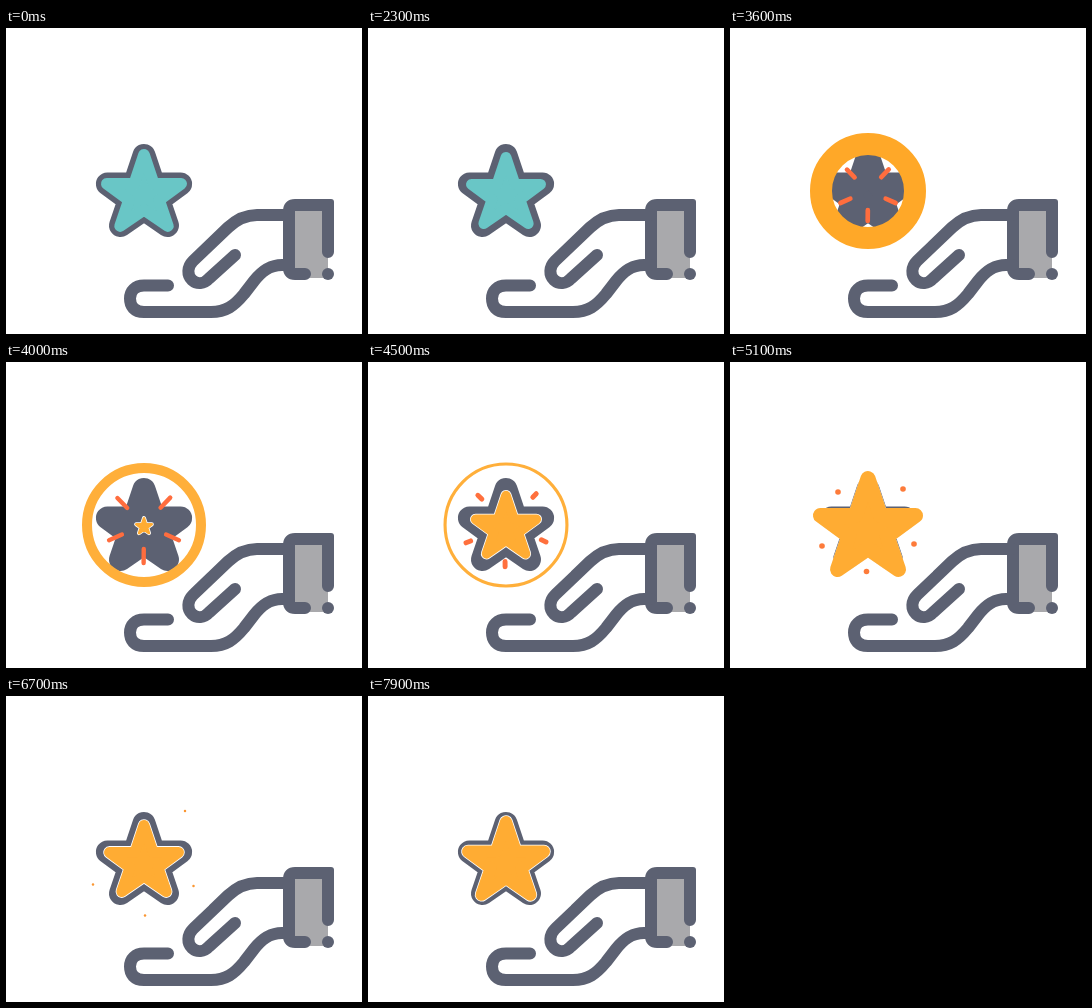
Recreate the animation shown at these times as an HTML page. Size 356 px wide and 306 px high, loop 8 s.

```html
<!DOCTYPE html>
<html lang="en">
<head>
<meta charset="utf-8">
<title>Star in hand</title>
<style>
  html, body { margin: 0; width: 100%; height: 100%; overflow: hidden; background: #fff; }
  svg { display: block; width: 100vw; height: 100vh; }
  .line { fill: none; stroke: #5c6172; stroke-width: 12; stroke-linecap: round; stroke-linejoin: round; }
</style>
</head>
<body>
<svg viewBox="0 0 356 306">
  <defs>
    <path id="star" d="M0-47.5 12.4-10.5 47.5-10.5 19.2 10.3 30.5 43.5 0 22.5-30.5 43.5-19.2 10.3-47.5-10.5-12.4-10.5Z"
      stroke-linejoin="round"/>
  </defs>

  <path fill="#a9a9ac" d="M286 180H322V250H286Z"/>
  <path class="line" d="M299 246H289Q283 246 283 240V183Q283 177 289 177H322V224"/>
  <path fill="#5c6172" d="M318 171H325Q328 171 328 174V182H318Z"/>
  <circle cx="322" cy="246" r="6" fill="#5c6172"/>
  <path class="line" d="M283 187H251C238 187 229 193 222 199.500L187 233C181 239 181 247 186 252C191 256.500 198 256 203 250.500L229 227"/>
  <path class="line" d="M283 237H276C263 237 255 244 248 253L238 266C228 278 220 284 205 284H138C128 284 124 278 124 270.500C124 263 129 257.500 138 257.500H162"/>

  <g transform="translate(138 164)">
    <use href="#star" transform="scale(.77)" fill="#5c6172" stroke="#5c6172" stroke-width="29.900"/>
    <g id="teal">
      <use href="#star" fill="#69c6c6" stroke="#69c6c6" stroke-width="15"/>
    </g>
    <g transform="translate(0 -1)">
      <circle id="halo" fill="none" stroke="#fff"/>
      <circle id="ring" fill="none"/>
    </g>
    <g id="rays" transform="translate(0 -1)" stroke-linecap="round"></g>
    <g id="gold">
      <use id="rim" href="#star" fill="#fff" stroke="#fff"/>
      <use href="#star" fill="#ffac33" stroke="#ffac33" stroke-width="15"/>
    </g>
  </g>
</svg>
<script>
const LOOP = 8000, STEP = 100;
const $ = id => document.getElementById(id);

// Each track alternates time and value.
const tealSize = [0, .782, 199, .782, 200, .727, 2300, .727, 2400, .62, 2500, .45, 2600, .22, 2700, 0];
const goldSize = [3700, 0, 4000, .164, 4300, .42, 4600, .75, 4900, .97, 5100, 1, 5400, .965,
  5800, .87, 6300, .77, 6700, .727, 7100, .725, 7500, .76, 7900, .8];
const outerRadius = [2600, 0, 2800, 17, 3100, 41.5, 3300, 50.5, 3600, 58, 4000, 62, 4300, 62.5];
const holeRadius = [3100, 0, 3400, 24, 3700, 42, 4000, 52, 4400, 58.5, 4850, 62.5];
const rayTip = [2800, 8, 3100, 16.5, 3500, 28, 4000, 38];
const rayTail = [2800, 6, 3100, 13.5, 3500, 18, 4000, 24];
const rayWidth = [2800, 0, 2900, 4, 3100, 5, 4000, 4.4, 5100, 5.6, 5800, 4.2, 6700, 2.5];

const mix = (a, b, k) => a + (b - a) * k;
const clamp = k => Math.max(0, Math.min(1, k));
const span = (t, a, b) => clamp((t - a) / (b - a));
const blend = (a, b, k) => `rgb(${a.map((v, i) => Math.round(mix(v, b[i], k)))})`;

function track(keys, t) {
  if (t <= keys[0]) return keys[1];
  for (let i = 2; i < keys.length; i += 2)
    if (t <= keys[i]) return mix(keys[i - 1], keys[i + 1], span(t, keys[i - 2], keys[i]));
  return keys[keys.length - 1];
}

function set(el, attrs) {
  for (const name in attrs) el.setAttribute(name, attrs[name]);
}

// dir: direction of the ray; near and far: where its dot flies; end: when it is gone
const rays = [
  { dir: [-.7, -.71], near: [-30, -33], far: [-34, -40], end: 6600 },
  { dir: [.69, -.72], near: [35, -36], far: [41, -48], end: 7800 },
  { dir: [.92, .4], near: [46, 19], far: [49.5, 27], end: 7500 },
  { dir: [-.01, 1], near: [-1.5, 46.5], far: [1, 56.5], end: 7800 },
  { dir: [-.92, .4], near: [-46, 21], far: [-51, 25.5], end: 7500 }
].map(ray => {
  ray.el = document.createElementNS("http://www.w3.org/2000/svg", "path");
  $("rays").append(ray.el);
  return ray;
});

function drawRay(ray, t) {
  const width = track(rayWidth, t) * (1 - span(t, ray.end - 1100, ray.end) ** 3);
  const point = (length, arrive) => ray.dir.map((d, i) => {
    const start = mix(d * length, ray.near[i], span(t, 4000, arrive));
    return mix(start, ray.far[i], span(t, 5100, 6700));
  });
  const tip = point(track(rayTip, t), 5100);
  const tail = point(track(rayTail, t), 4900);
  // After the tail has caught up, only a dot is left.
  const from = t >= 4900 ? tip : tail;
  set(ray.el, {
    d: `M${from}L${tip[0] + .01} ${tip[1]}`,
    stroke: blend([255, 109, 62], [250, 150, 50], span(t, 4300, 6700)),
    "stroke-width": width,
    visibility: t > 2800 && t < ray.end ? "visible" : "hidden"
  });
}

function drawStar(el, size) {
  set(el, { transform: `scale(${size})`, visibility: size > 0 ? "visible" : "hidden" });
}

function draw(t) {
  drawStar($("teal"), track(tealSize, t));

  const size = track(goldSize, t);
  drawStar($("gold"), size);
  set($("rim"), { "stroke-width": 15 + (size > .85 ? 0 : 1.6 / Math.max(size, .05)) });

  const outer = track(outerRadius, t), hole = track(holeRadius, t);
  const shown = outer > hole ? "visible" : "hidden";
  set($("ring"), {
    r: (outer + hole) / 2,
    "stroke-width": Math.max(0, outer - hole),
    stroke: blend([255, 159, 17], [255, 175, 58], span(t, 3100, 4000)),
    visibility: shown
  });
  set($("halo"), { r: outer + .4, "stroke-width": 1, visibility: shown });

  rays.forEach(ray => drawRay(ray, t));
}

function frame() {
  const t = performance.now() % LOOP;
  draw(Math.floor(t / STEP) * STEP);
  requestAnimationFrame(frame);
}
frame();
</script>
</body>
</html>
```
